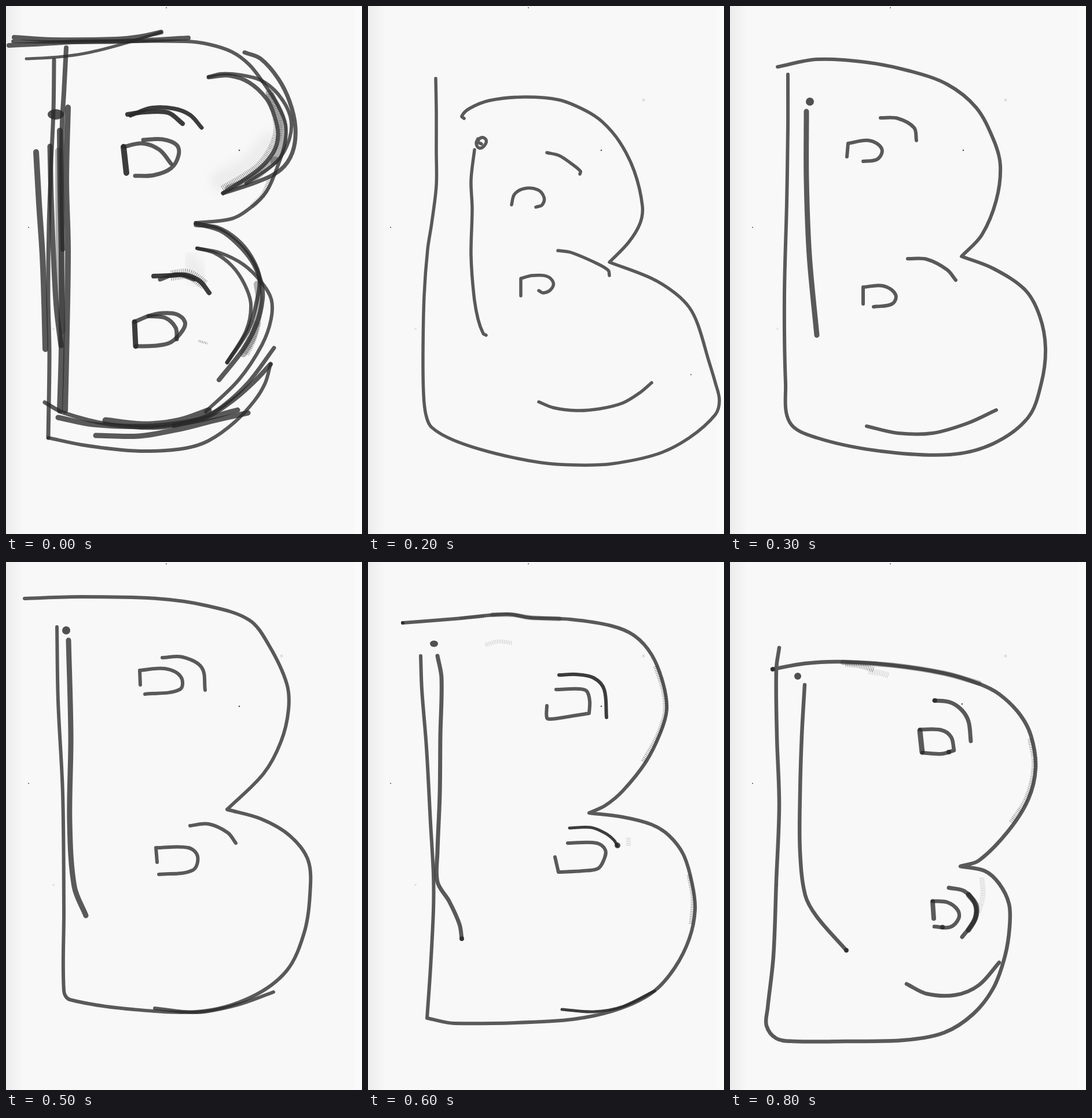
Animation of 615 by 911 pixels, one loop 900 ms. Source, as an HTML page:

```html
<!DOCTYPE html>
<html lang="en">
<head>
<meta charset="utf-8">
<title>Drawn letter B</title>
<style>
  html, body { margin: 0; width: 100%; height: 100%; overflow: hidden; background: #f8f8f8; }
  svg { display: block; width: 100%; height: 100%; }
  .ink { fill: none; stroke: #282828; stroke-opacity: .76; stroke-linecap: round; stroke-linejoin: round; }
  .ink circle, .ink ellipse, .ink polygon { fill: #262626; fill-opacity: .8; stroke: none; }
  .dark { stroke-opacity: .9; }
  .wash { stroke-opacity: .35; }
  .fur { stroke-dasharray: 1 2; stroke-linecap: butt; stroke-opacity: .5; }
  .pale { stroke-opacity: .22; }
  .haze { stroke: #999; stroke-opacity: .13; filter: url(#soft); }
  .faint { stroke: #999; stroke-opacity: .55; stroke-width: 1.5; }
  .page {
    visibility: hidden;
    animation: show 900ms step-end infinite;
    animation-delay: calc((var(--n) - 9) * 100ms);
  }
  @keyframes show {
    0% { visibility: visible; }
    11.1111%, 100% { visibility: hidden; }
  }
</style>
</head>
<body>
<svg viewBox="0 0 615 911" preserveAspectRatio="none">
  <defs>
    <linearGradient id="edge">
      <stop offset="0" stop-color="#ececec"/>
      <stop offset="1" stop-color="#f8f8f8"/>
    </linearGradient>
    <filter id="soft" x="-50%" y="-50%" width="200%" height="200%"><feGaussianBlur stdDeviation="9"/></filter>
  </defs>
  <rect width="615" height="911" fill="#f8f8f8"/>
  <rect width="30" height="911" fill="url(#edge)"/>
  <rect x="602" width="13" height="911" fill="#fafafa"/>
  <g fill="#555">
    <circle cx="39" cy="382" r="1"/>
    <circle cx="277" cy="3" r="1"/>
    <circle cx="476" cy="162" r="2.5" fill="#ddd"/>
    <circle cx="82" cy="557" r="2" fill="#e4e4e4"/>
  </g>

  <g class="ink" stroke-width="7">
    <g class="page" style="--n:0">
      <polyline class="haze" stroke-width="34" points="370,302 420,275 455,235"/>
      <polyline class="haze" stroke-width="30" points="318,440 335,470"/>
      <polyline class="wash" stroke-width="13" points="455,150 475,190 479,230 463,268"/>
      <polyline class="wash" stroke-width="13" points="385,315 425,298 465,266"/>
      <polyline class="wash" stroke-width="12" points="434,480 438,515 427,570 410,600"/>
      <polyline stroke-width="8" points="5,68 50,66 120,62 200,61 315,55"/>
      <polyline stroke-width="8" points="14,54 80,58 190,57 230,53 268,45"/>
      <polyline stroke-width="5" points="35,91 90,88 140,81 200,66 268,45"/>
      <polyline stroke-width="6" points="12,61 100,62 200,61 310,61 350,66 390,79 420,101 445,133 470,172 483,205 481,240 466,285 450,320 425,346 390,367 328,374"/>
      <polyline points="412,80 440,91 470,125 490,165 500,210 495,252 475,282 435,303 375,323"/>
      <polyline points="350,123 385,120 420,132 450,160 464,190 470,222 462,252 435,283 375,323"/>
      <polyline stroke-width="6" points="350,122 372,117 405,119 440,128 470,152 491,190 490,228 468,268 415,306"/>
      <polyline class="fur" stroke-width="16" points="375,317 410,297 440,275 463,240 470,205 455,150"/>
      <polyline class="fur" stroke-width="9" points="457,295 445,325 425,346"/>
      <polyline points="83,93 82,180 78,270 74,380 73,500 75,600 73,745"/>
      <polyline stroke-width="8" points="104,72 100,150 97,200 96,300 98,420"/>
      <polyline stroke-width="10" points="52,252 57,340 63,430 66,510 68,592"/>
      <polyline stroke-width="9" points="76,242 78,330 82,430 87,520 95,586"/>
      <polyline stroke-width="10" points="93,215 94,320 96,430 96,590 93,698"/>
      <polyline stroke-width="10" points="107,175 104,300 107,420 105,560 102,698"/>
      <polyline class="wash" stroke-width="12" points="91,250 92,400 97,560"/>
      <ellipse cx="86" cy="187" rx="14" ry="9"/>
      <polyline stroke-width="6" points="73,745 130,757 200,766 250,768 310,763 350,750 395,718 430,680 448,650 457,618"/>
      <polyline points="67,684 100,702 180,722 270,727 340,710 375,690 420,648 463,590"/>
      <polyline stroke-width="8" points="457,618 430,647 395,678 345,710 290,724"/>
      <polyline stroke-width="9" points="90,710 150,722 250,725 330,715 400,697"/>
      <polyline stroke-width="9" points="155,741 230,742 300,730 360,715 418,702"/>
      <polyline stroke-width="11" points="172,715 240,722 300,715 350,698"/>
      <polyline stroke-width="8" points="328,375 370,387 400,410 425,440 440,475 443,505 433,548 410,592 368,645"/>
      <polyline points="328,378 365,382 398,402 424,433 438,470 432,515 418,560 382,615"/>
      <polyline stroke-width="6" points="330,418 360,426 390,448 412,480 423,515 415,560 382,615"/>
      <polyline stroke-width="6" points="330,418 370,426 410,446 440,475 458,505 458,540 442,585 402,645 345,700"/>
      <polyline class="fur" stroke-width="17" points="433,545 424,575 412,600"/>
      <polyline class="dark" stroke-width="8" points="210,187 240,183 280,184 305,203"/>
      <polyline class="dark" points="215,189 250,176 290,177 318,188 338,210"/>
      <polyline class="dark" stroke-width="10" points="203,243 208,288"/>
      <polyline points="203,243 235,237 265,248 285,272"/>
      <polyline points="237,231 270,230 295,240 298,258 285,280 255,292 223,293"/>
      <polyline class="dark" stroke-width="8" points="255,466 285,465 310,464 335,475 351,495"/>
      <polyline points="266,472 295,463 325,472"/>
      <polyline class="fur" stroke-width="18" points="285,465 315,463 343,481"/>
      <polyline class="dark" stroke-width="9" points="222,545 224,587"/>
      <polyline points="224,587 260,586 285,580 305,560 309,545 295,532 270,530 246,535 222,545"/>
      <polyline points="246,535 275,538 293,555 295,575"/>
      <polyline class="fur" stroke-width="4" points="333,578 348,582"/>
      <circle cx="403" cy="249" r="1.3"/>
    </g>

    <g class="page" style="--n:1">
      <rect y="880" width="615" height="31" fill="#2b2b2b" stroke="none"/>
      <rect x="6" y="880" width="606" height="31" fill="#898989" stroke="none"/>
      <rect x="6" y="880" width="606" height="3" fill="#aaa" stroke="none"/>
      <polyline stroke-width="8" points="11,151 60,148 110,143 170,137 228,135"/>
      <polyline stroke-width="6" points="11,153 100,147 200,142 285,140 330,147 365,164 392,191 415,232 430,272 435,310 433,360 423,405 404,446 390,465 372,477"/>
      <polyline stroke-width="5" points="27,167 80,158 160,150 240,142 285,140"/>
      <polyline stroke-width="6" points="293,180 330,173 370,181 400,211 420,258 428,310 423,360 408,398 382,426"/>
      <polyline class="wash" stroke-width="9" points="412,235 424,285 426,330 417,375"/>
      <polyline class="fur" stroke-width="13" points="413,250 421,300 420,350 408,390"/>
      <polyline class="dark" stroke-width="8" points="322,198 345,189 370,193 388,205"/>
      <polyline class="dark" stroke-width="11" points="334,187 360,183 393,193"/>
      <polyline class="dark" stroke-width="11" points="293,272 297,313"/>
      <polyline points="300,318 340,313 375,300 395,280 398,262 385,245 360,235 318,233"/>
      <polyline points="312,248 345,244 375,253 389,270 383,286 360,296 325,293"/>
      <polyline points="312,302 350,299 382,287"/>
      <polyline stroke-width="9" points="79,182 84,240 83,350 85,500 84,620 82,745"/>
      <polyline stroke-width="8" points="84,225 72,265 62,320 57,400 58,500 64,600 75,685 80,745"/>
      <polyline stroke-width="10" points="98,208 95,300 94,400 92,500 94,600 92,770"/>
      <polyline class="wash" stroke-width="12" points="86,230 88,400 87,600 87,740"/>
      <polyline stroke-width="10" points="111,240 109,350 110,450 109,550 110,650 116,800"/>
      <polyline stroke-width="10" points="113,238 116,320 115,400 116,470 122,550 126,590"/>
      <polyline stroke-width="8" points="130,250 134,300 131,400 128,480 129,540 133,592"/>
      <circle cx="123" cy="215" r="10.5"/>
      <polyline class="dark" stroke-width="8" points="288,477 310,470 335,475 355,484"/>
      <polyline class="dark" stroke-width="10" points="306,467 340,470 369,492"/>
      <polyline class="dark" stroke-width="10" points="258,535 256,588"/>
      <polyline stroke-width="6" points="258,535 300,538 325,550 338,578"/>
      <polyline points="288,517 325,519 350,532 358,552 345,580 315,594 262,598"/>
      <polyline points="305,518 335,530 350,555 340,575 310,585 275,586"/>
      <polyline points="350,468 395,476 433,505 458,545 464,580 456,630 432,680 400,714 360,732 290,747 200,757 82,748"/>
      <polyline points="355,466 400,473 442,507 468,550 477,600 470,650 448,692 412,714 360,736 280,751 130,770 8,777"/>
      <polyline points="320,491 345,498 375,518 400,545 418,572 432,597 433,615 427,642 412,674 385,708 340,745 290,770 240,782 150,790 80,787 8,775"/>
      <polyline points="345,490 375,507 398,533 412,560 418,595 414,640 400,670 375,696 345,715 280,738 190,753 20,760"/>
      <polyline stroke-width="6" points="380,612 370,640 340,675 290,715 230,740 170,750 80,749"/>
      <polyline stroke-width="8" points="14,760 60,768 120,770 180,769"/>
      <polyline class="wash" stroke-width="14" points="140,771 190,768 242,762"/>
      <circle cx="394" cy="194" r="4"/>
      <circle cx="357" cy="483" r="4"/>
      <circle cx="323" cy="293" r="3"/>
      <circle cx="87" cy="813" r="1.4"/>
    </g>

    <g class="page" style="--n:2" stroke-width="5.5">
      <polyline points="117,125 118,180 118,250 118,310 110,375 103,420 97,500 95,600 96,670 100,705 110,727 150,750 220,772 300,788 360,792 420,790 500,773 555,745 600,705 607,680 600,650 588,610 570,550 555,520 530,495 490,470 417,442 417,442 450,408 470,375 474,345 460,285 435,235 405,200 375,180 330,162 270,157 210,163 175,177 162,190 166,194"/>
      <polyline points="190,229 187,237 192,245 201,241 204,231 196,227 190,234 196,238"/>
      <polyline points="184,248 178,300 180,350 178,430 183,500 190,540 199,565 204,568"/>
      <polyline points="309,253 330,258 350,271 367,285 366,290"/>
      <polyline points="248,343 253,325 270,315 293,317 304,330 301,343 290,347"/>
      <polyline points="328,422 350,425 395,444 415,456 417,465"/>
      <polyline points="264,500 264,470 264,470 284,465 308,466 320,477 316,489 303,495 295,491"/>
      <polyline points="295,683 320,693 360,698 400,695 440,685 470,667 490,650"/>
      <circle cx="403" cy="249" r="1.3"/>
      <circle cx="558" cy="636" r="1"/>
    </g>

    <g class="page" style="--n:3" stroke-width="6">
      <polyline points="82,105 150,92 235,97 310,112 375,135 425,175 455,230 467,275 460,335 435,395 400,432 400,432 455,453 510,490 535,535 545,590 538,650 515,710 455,755 380,774 260,768 150,745 103,718 96,650 94,500 98,340 100,210 100,118"/>
      <polyline stroke-width="9" points="132,182 132,300 137,430 150,568"/>
      <circle cx="138" cy="165" r="7"/>
      <polyline points="260,193 290,194 318,210 322,232"/>
      <polyline points="202,260 204,237 204,237 240,232 262,246 255,264 230,268"/>
      <polyline points="307,436 340,437 375,455 390,473"/>
      <polyline points="230,514 230,485 230,485 265,483 286,498 280,514 248,519"/>
      <polyline points="236,725 290,737 350,737 410,720 460,697"/>
      <circle cx="403" cy="249" r="1.3"/>
    </g>

    <g class="page" style="--n:4">
      <polyline points="3,20 100,22 200,27 270,35 320,50 375,75 415,110 445,160 460,205 460,260 445,318 430,365 410,398 382,422 382,422 405,431 440,456 470,480 483,497 488,520 488,545 482,580 473,612 458,655 440,694 420,717 380,739 350,754 310,757 200,747 120,732 103,715 97,680 94,600 93,565"/>
      <polyline class="wash" stroke-width="8" points="375,75 415,110 445,160 459,205 459,260 445,315"/>
      <polyline class="fur" stroke-width="13" points="390,92 425,130 445,170 455,215 454,265 445,312"/>
      <polyline class="fur" stroke-width="9" points="200,28 235,31"/>
      <polyline class="haze" stroke-width="8" points="338,234 370,234"/>
      <polygon points="76,115 98,108 103,230 107,420 117,567 95,574 86,400 80,230"/>
      <polyline stroke-width="9" points="83,66 85,115 90,250 94,400 100,562"/>
      <polyline class="dark" stroke-width="9" points="74,115 95,110"/>
      <polyline stroke-width="3" points="70,75 69,80"/>
      <circle cx="106" cy="564" r="10"/>
      <polyline points="157,177 154,152 154,152 175,148 205,152 222,165 218,178 200,183 172,185"/>
      <polyline class="dark" stroke-width="8" points="211,138 235,133 265,141 282,157 276,174"/>
      <polyline class="dark" points="287,450 310,445 340,453 357,466 362,480"/>
      <polyline points="197,527 196,501 196,501 230,501 250,514 252,530 235,542 199,543"/>
      <polyline class="dark" stroke-width="9" points="178,766 230,777 300,777 370,766 428,745"/>
      <polyline class="dark" points="183,774 230,781 300,780 380,765 428,745"/>
      <circle cx="176" cy="780" r="4"/>
      <circle cx="212" cy="137" r="6"/>
      <circle cx="275" cy="174" r="5"/>
      <circle cx="361" cy="480" r="5"/>
      <polyline class="faint" points="566,897 577,894 577,894 570,908"/>
      <polyline class="faint" points="567,903 577,900"/>
      <circle cx="403" cy="249" r="1.3"/>
    </g>

    <g class="page" style="--n:5" stroke-width="6">
      <polyline points="32,63 130,60 260,63 345,75 420,100 455,145 485,210 488,255 475,310 445,365 382,427 382,427 440,443 490,472 522,515 525,575 515,640 485,705 425,750 340,775 220,772 110,755 100,740 100,600 98,400 90,240 88,112"/>
      <polyline stroke-width="9" points="108,135 112,300 110,450 118,560 138,610"/>
      <circle cx="104" cy="118" r="7"/>
      <polyline points="270,165 305,164 338,182 344,221"/>
      <polyline points="232,212 231,187 231,187 275,184 302,198 300,220 240,228"/>
      <polyline points="318,455 350,452 383,467 397,485"/>
      <polyline points="261,518 259,493 259,493 315,493 331,508 322,532 264,539"/>
      <polyline points="257,770 330,777 400,764 462,742"/>
      <circle cx="403" cy="249" r="1.3"/>
    </g>

    <g class="page" style="--n:6" stroke-width="6">
      <polyline points="60,105 150,98 240,90 280,96 350,99 420,110 460,127 490,160 510,210 516,255 505,295 480,345 440,395 410,420 382,433 382,433 440,440 490,453 520,472 545,505 560,555 565,600 555,650 530,700 495,740 450,765 390,783 320,792 150,796 102,787 102,787 108,700 113,600 113,540 108,450 101,320 93,220 91,162"/>
      <polyline class="wash" stroke-width="8" points="215,91 250,91 280,96 330,98"/>
      <polyline class="fur" stroke-width="8" points="497,180 511,225 513,260 500,300 475,345"/>
      <polyline class="fur" stroke-width="7" points="554,540 561,580 558,625"/>
      <polyline class="fur" stroke-width="6" points="160,97 200,94"/>
      <polyline class="fur pale" stroke-width="7" points="203,143 225,137 250,140"/>
      <polyline class="fur pale" stroke-width="8" points="450,476 450,489"/>
      <polyline stroke-width="7" points="120,162 127,200 125,300 124,400 120,500 120,552 140,585 158,625 162,650"/>
      <ellipse cx="114" cy="141" rx="7" ry="5.5"/>
      <polyline class="dark" points="330,195 360,194 390,200 408,220 412,268"/>
      <polyline points="325,220 365,219 378,223 383,240 382,261 382,261 345,267 315,271 309,269 309,248"/>
      <polyline class="dark" stroke-width="5" points="348,459 385,458 410,468 425,480 431,490"/>
      <polyline points="345,485 395,485 410,497 407,515 397,529 370,533 329,535 329,535 323,509"/>
      <polyline class="dark" stroke-width="5" points="335,772 390,776 440,767 495,740"/>
      <circle cx="60" cy="105" r="3"/>
      <circle cx="162" cy="650" r="4"/>
      <circle cx="431" cy="489" r="5"/>
      <circle cx="403" cy="249" r="1.3"/>
    </g>

    <g class="page" style="--n:7" stroke-width="6">
      <polyline points="68,145 150,136 260,134 360,145 430,162 475,188 508,235 522,305 510,350 480,400 440,450 390,479 390,479 440,487 490,520 515,560 523,610 515,665 485,715 440,770 380,800 300,809 110,812 83,803 83,803 92,690 96,560 95,420 90,290 86,155"/>
      <polyline stroke-width="7" points="125,187 126,300 122,430 122,525 136,585 181,660"/>
      <circle cx="115" cy="169" r="6"/>
      <polyline points="342,217 375,218 404,238 414,289"/>
      <polyline points="318,284 318,254 318,254 365,253 383,266 385,293 385,293 320,300"/>
      <polyline points="363,510 397,514 422,536 418,568"/>
      <polyline points="337,562 338,535 338,535 382,535 403,552 393,578 343,582"/>
      <polyline points="320,750 365,761 425,751 480,715"/>
      <circle cx="403" cy="249" r="1.3"/>
    </g>

    <g class="page" style="--n:8" stroke-width="6.5">
      <polyline points="85,148 80,185 81,300 85,420 80,550 75,680 65,770 63,800 80,822 110,827 200,827 300,825 370,812 420,780 455,735 475,680 483,630 482,590 465,555 440,533 398,525 398,525 430,515 480,465 515,410 528,355 520,300 500,262 465,228 430,210 370,192 280,178 190,172 130,175 73,185"/>
      <polyline class="wash" stroke-width="9" points="195,173 280,178 370,192 430,209"/>
      <polyline class="fur" stroke-width="9" points="200,176 225,179 248,186"/>
      <polyline class="fur pale" stroke-width="10" points="240,189 262,192 275,196"/>
      <polyline class="fur" stroke-width="8" points="518,305 525,350 513,405 485,450"/>
      <polyline points="129,212 124,300 121,400 121,500 130,575 150,612 201,670"/>
      <circle cx="117" cy="197" r="6"/>
      <polyline stroke-width="7" points="353,239 380,242 400,255 412,275 416,309"/>
      <polyline stroke-width="9" points="328,291 332,328"/>
      <polyline points="328,289 365,290 382,302 387,325 387,325 365,331 332,329"/>
      <polyline stroke-width="7" points="378,562 405,568 423,590 423,617 401,647"/>
      <polyline stroke-width="9" points="412,574 425,592 424,614 412,635"/>
      <polyline class="fur pale" stroke-width="9" points="435,545 437,575 429,605"/>
      <polyline stroke-width="8" points="352,615 350,586"/>
      <polyline points="350,585 375,587 393,600 395,615 380,630 353,629"/>
      <polyline points="305,728 340,745 390,747 430,730 465,691"/>
      <circle cx="74" cy="185" r="4"/>
      <circle cx="354" cy="239" r="4"/>
      <circle cx="378" cy="328" r="4"/>
      <circle cx="367" cy="630" r="4"/>
      <circle cx="201" cy="670" r="4"/>
      <circle cx="401" cy="245" r="1.3"/>
    </g>
  </g>
</svg>
<script>
  // Turns a polyline into a smooth curve; a repeated point makes a corner.
  function smooth(points) {
    const dist = (a, b) => Math.hypot(b[0] - a[0], b[1] - a[1]);
    const handle = (at, from, to, length) => {
      const k = length / 3 / (dist(from, to) || 1);
      return [at[0] + (to[0] - from[0]) * k, at[1] + (to[1] - from[1]) * k];
    };
    let d = `M${points[0]}`;
    for (let i = 1; i < points.length; i++) {
      const a = points[i - 1], b = points[i], length = dist(a, b);
      if (!length) continue;
      const before = points[i - 2] || a, after = points[i + 1] || b;
      d += `C${handle(a, before, b, length)} ${handle(b, after, a, length)} ${b}`;
    }
    return d;
  }

  for (const line of document.querySelectorAll('polyline')) {
    const path = document.createElementNS(line.namespaceURI, 'path');
    for (const { name, value } of line.attributes) {
      if (name !== 'points') path.setAttribute(name, value);
    }
    const points = line.getAttribute('points').split(' ').map(p => p.split(',').map(Number));
    path.setAttribute('d', smooth(points));
    line.replaceWith(path);
  }
</script>
</body>
</html>
```
